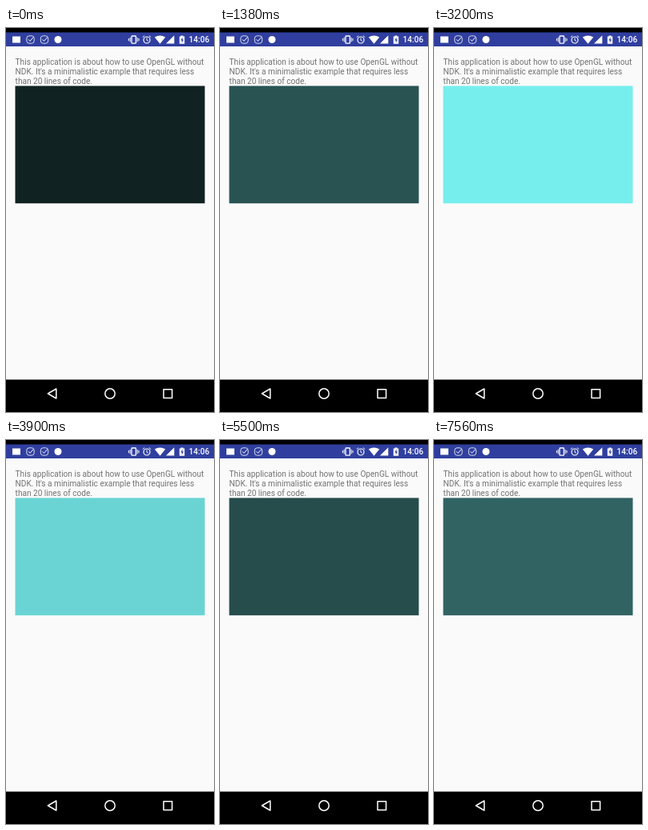
An HTML page for the animation above (7660 ms loop, 260 by 480 pixels).

```html
<!DOCTYPE html>
<html lang="en">
<head>
<meta charset="utf-8">
<title>Clear colour demo</title>
<style>
html, body { margin: 0; width: 100%; height: 100%; overflow: hidden; background: #000; }
svg { display: block; width: 260px; height: 480px; }
text { font: 10.11px Roboto, Arial, sans-serif; }
.clock { font-weight: 500; }
.line { fill: none; stroke: #fff; stroke-width: 1; }
.nav { fill: none; stroke: #fff; stroke-width: 1.5; stroke-linejoin: round; }
</style>
</head>
<body>
<svg viewBox="0 0 260 480">
  <rect width="260" height="480"/>
  <rect y="5.5" width="260" height="17.5" fill="#303f9f"/>
  <rect y="23" width="260" height="416.5" fill="#fafafa"/>

  <!-- status bar: notifications -->
  <g fill="#fff">
    <rect x="8" y="10.5" width="10" height="8"/>
    <circle cx="65" cy="14.5" r="4.5"/>
  </g>
  <g id="check" class="line">
    <rect x="25.8" y="9.8" width="9.4" height="9.4" rx="3.2" stroke="#d4d9ea"/>
    <path d="M28 14.3l2 2.1 4.2-4.8"/>
  </g>
  <use href="#check" x="17.5"/>

  <!-- status bar: system -->
  <g class="line">
    <rect x="157" y="10" width="5.4" height="9.2" rx=".8" stroke-width="1.3"/>
    <path d="M155.2 11.8v5.6M153.4 13v3.2M164.2 11.8v5.6M166 13v3.2"/>
    <circle cx="176" cy="15" r="4" stroke-width="1.2"/>
    <path d="M176 12.5v2.8l1.8 1.1M170.8 11.6l2.4-2M181.2 11.6l-2.4-2"/>
  </g>
  <g fill="#fff">
    <path d="M185.8 11.6Q192.5 7.4 199.2 11.6L192.5 19.7Z"/>
    <path d="M200 19.6L210.3 9.3V19.6Z"/>
    <path d="M216.8 10.5h1.8V9.4h2.8v1.1h1.8v9.2h-6.4Z"/>
    <path d="M220.6 11.6l-2.2 4h1.4v2.8l2.2-4h-1.4Z" fill="#303f9f"/>
    <text class="clock" x="228.5" y="18.4">14:06</text>
  </g>

  <g fill="#737373">
    <text x="11.6" y="46">This application is about how to use OpenGL without</text>
    <text x="11.6" y="58">NDK. It's a minimalistic example that requires less</text>
    <text x="11.6" y="70">than 20 lines of code.</text>
  </g>
  <rect id="surface" x="11.5" y="72.4" width="237" height="146.8"/>

  <g class="nav">
    <path d="M52.4 457L62.8 451V463Z"/>
    <circle cx="130" cy="457" r="6.2"/>
    <rect x="197" y="451.8" width="10.6" height="10.6"/>
  </g>
</svg>
<script>
const LOOP = 7660, STEP = 20;
const DARK = 400, FADE = 3000; // first darkest moment, time from dark to bright
const surface = document.getElementById('surface');

// Triangle wave between 0 and 1
function brightness(t) {
  const phase = ((t - DARK) / FADE + 2) % 2;
  return 1 - Math.abs(phase - 1);
}

function draw(now) {
  const t = Math.floor(now % LOOP / STEP) * STEP;
  const c = Math.round(255 * brightness(t));
  surface.setAttribute('fill', `rgb(${c >> 1}, ${c}, ${c})`);
  requestAnimationFrame(draw);
}
draw(0);
</script>
</body>
</html>
```
